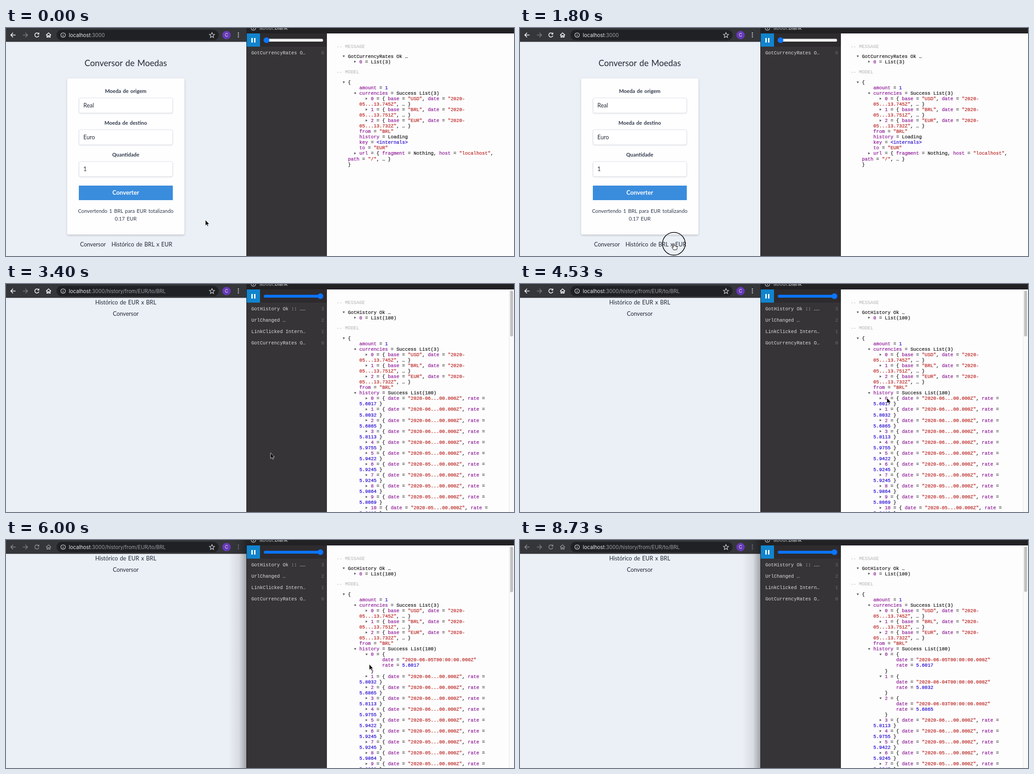
Animation of 1116 by 502 pixels, one loop 8.79 s. Source, as an HTML page:

```html
<!DOCTYPE html>
<html lang="pt">
<head>
<meta charset="utf-8">
<title>Conversor de Moedas</title>
<style>
html, body { margin: 0; width: 100%; height: 100%; overflow: hidden; background: #ebeff6 }
svg { display: block; width: 1116px; height: 502px }
.page { font-family: Lato, sans-serif; font-size: 12.5px; word-spacing: .1em; fill: #222b38 }
.page .c { text-anchor: middle }
.page .label { font-size: 11.35px; font-weight: 700; fill: #2f3a4a }
.page .sum { font-size: 11.25px; fill: #2f3a4a }
.field { fill: #fff; stroke: #dce1e9 }
.ui { font: 11.2px Inter, sans-serif }
.code { font: 10.44px "Liberation Mono", monospace; fill: #111; stroke: #111; stroke-width: .2 }
.code path, .code rect, .code circle { stroke: none }
.key { fill: #881391; stroke: #881391 }
.str { fill: #b5201c; stroke: #b5201c }
.num { fill: #1c00cf; stroke: #1c00cf }
.head { fill: #b4b4b4; stroke: none }
.item { fill: #dcdcdc; stroke: none }
.idx { fill: #6c6a6d; stroke: none }

.on, .icons, .shape { animation: 8.79s step-end infinite }
@keyframes route   { 0% { visibility: hidden } 21.27%, to { visibility: visible } }
@keyframes url     { 0% { visibility: hidden } 21.95%, to { visibility: visible } }
@keyframes loaded  { 0% { visibility: hidden } 30.7%,  to { visibility: visible } }
@keyframes blur    { 0% { visibility: hidden } 52.8%,  to { visibility: visible } }
@keyframes open1   { 0% { visibility: hidden } 65.3%,  to { visibility: visible } }
@keyframes open2   { 0% { visibility: hidden } 78.1%,  to { visibility: visible } }
@keyframes open3   { 0% { visibility: hidden } 88.05%, to { visibility: visible } }
.icons { animation-name: dim; color: #fff }
@keyframes dim { 0% { color: #fff } 52.8%, to { color: #8b8d91 } }

#arrow { animation-name: arrow }
#hand { animation-name: hand }
#beam { animation-name: beam }
@keyframes arrow {
  0%, 23.2%, 66.6%, 91% { visibility: visible }
  13.2%, 54.6%, 72.5% { visibility: hidden }
  to { visibility: visible }
}
@keyframes hand { 0%, 23.2%, to { visibility: hidden } 13.2% { visibility: visible } }
@keyframes beam { 0%, 66.6%, 91%, to { visibility: hidden } 54.6%, 72.5% { visibility: visible } }

#pointer { animation: move 8.79s ease-in-out infinite }
@keyframes move {
  0%, 2% { transform: translate(438px, 423px) }
  13.5% { transform: translate(342px, 467px) }
  17%, 22% { transform: translate(338px, 475px) }
  29.58%, 33% { transform: translate(485px, 424px) }
  48%, 55% { transform: translate(806px, 251px) }
  61.5%, 66.5% { transform: translate(792px, 252px) }
  68.26% { transform: translate(798px, 274px) }
  74%, 79.6% { transform: translate(791px, 300px) }
  84%, 89% { transform: translate(789.5px, 348px) }
  94.5%, to { transform: translate(880px, -30px) }
}
#ring { fill: none; stroke: #000; stroke-width: 1.5; vector-effect: non-scaling-stroke; animation: press 8.79s linear infinite }
@keyframes press {
  0%, 18.66%, 21.96%, 51.99%, 54.95%, 63.71%, 66.67%, 76.68%, 79.64%, 85.6%, 88.75%, to { transform: scale(0) }
  20.25%, 21.95%, 53.58%, 54.94%, 65.3%, 66.66%, 78.27%, 79.63%, 87.2%, 88.74% { transform: scale(1) }
}
</style>
</head>
<body>
<svg viewBox="0 0 1116 502">
  <defs>
    <linearGradient id="shade"><stop stop-opacity="0"/><stop offset=".6" stop-opacity=".08"/><stop offset="1" stop-opacity=".32"/></linearGradient>
    <filter id="drop" x="-10%" y="-10%" width="120%" height="120%"><feDropShadow dx="0" dy="2" stdDeviation="2" flood-opacity=".2"/></filter>
    <filter id="soft" x="-10%" y="-20%" width="120%" height="150%"><feDropShadow dx="0" dy="1" stdDeviation="1" flood-opacity=".14"/></filter>
  </defs>

  <g class="page">
    <rect y="30" width="528" height="472" fill="#ebeff6"/>
    <text class="c" x="263" y="84" font-size="18.6">Conversor de Moedas</text>
    <rect x="134.500" y="111" width="257.500" height="343.500" rx="3.500" fill="#fefeff" filter="url(#drop)"/>
    <text class="c label" x="263" y="142.700">Moeda de origem</text>
    <text class="c label" x="263" y="212.700">Moeda de destino</text>
    <text class="c label" x="263" y="282.700">Quantidade</text>
    <g class="field" filter="url(#soft)">
      <rect x="160.500" y="154" width="205.500" height="33" rx="3"/>
      <rect x="160.500" y="224" width="205.500" height="33" rx="3"/>
      <rect x="160.500" y="294" width="205.500" height="33" rx="3"/>
    </g>
    <text x="170" y="174.700">Real</text>
    <text x="170" y="244.700">Euro</text>
    <text x="170" y="314.700">1</text>
    <rect x="160" y="347" width="206.500" height="32" fill="#3a8ddd"/>
    <text class="c" x="263" y="367.300" font-size="13.1" font-weight="700" style="fill:#fff">Converter</text>
    <text class="c sum" x="263" y="407.300">Convertendo 1 BRL para EUR totalizando</text>
    <text class="c sum" x="263" y="424">0.17 EUR</text>
    <text class="c" x="191" y="481">Conversor</text>
    <text class="c" x="298.500" y="481">Histórico de BRL x EUR</text>
    <g class="on" style="animation-name:route">
      <rect y="30" width="528" height="472" fill="#ebeff6"/>
      <text class="c" x="263" y="44.500">Histórico de EUR x BRL</text>
      <text class="c" x="263" y="70">Conversor</text>
    </g>
  </g>

  <g class="ui">
    <rect width="528" height="30.500" fill="#35363a"/>
    <rect x="111" y="4" width="356" height="23" rx="11.500" fill="#202124"/>
    <g class="icons" fill="none" stroke="currentColor" stroke-width="1.500">
      <path d="M21 15.500H11M15.500 10.500l-5 5 5 5"/>
      <path d="M71.300 12.200a4.600 4.600 0 1 0 1 4.500"/>
      <path d="M73 9.500v4.700h-4.700z" fill="currentColor" stroke="none"/>
      <path d="M88 15.800l5.500-5 5.500 5M90 14.500v5.800h2.300v-3.500h2.400v3.500H97v-5.800"/>
      <path d="M510.500 10v2m0 2.300v2m0 2.300v2" stroke-width="2"/>
    </g>
    <path d="M37 15.500h10M42.500 10.500l5 5-5 5" fill="none" stroke="#7b7d81" stroke-width="1.500"/>
    <g fill="none" stroke="#d5d7da" stroke-width="1.200">
      <circle cx="125.500" cy="15.500" r="5"/>
      <path d="M125.500 14.800v3.600M125.500 12.200v1.400"/>
      <path d="M452.500 10l1.600 3.800 4.100.4-3.100 2.700.9 4-3.500-2.100-3.500 2.100.9-4-3.100-2.700 4.100-.4z"/>
    </g>
    <text x="138" y="19.500" fill="#e8eaed">localhost<tspan fill="#9aa0a6">:3000<tspan class="on" style="animation-name:url">/history/from/EUR/to/BRL</tspan></tspan></text>
    <circle cx="484.500" cy="15.500" r="9.300" fill="#673ab7"/>
    <text x="484.500" y="19" font-size="10" text-anchor="middle" fill="#e9e2f5">C</text>
    <rect class="on" style="animation-name:blur" x="488" width="40" height="502" fill="url(#shade)"/>
    <rect x="528" width="588" height="502" fill="#222225"/>
    <circle cx="543.500" cy="0" r="5" fill="none" stroke="#c5c7ca" stroke-width="1.200"/>
    <path d="M543.500 0v3" stroke="#c5c7ca" stroke-width="1.200"/>
    <text x="557" y="4.300" fill="#a3a6aa">about:<tspan fill="#d9dbde">blank</tspan></text>
  </g>

  <g id="debug" class="code"></g>

  <g id="pointer">
    <circle id="ring" r="25"/>
    <path id="arrow" class="shape" d="M0-.500V12.200L2.900 9.600 4.700 13.800 6.700 12.900 4.900 8.900H8.700Z" fill="#000" stroke="#fff" stroke-width=".8"/>
    <path id="hand" class="shape" d="M-1.200.500Q0-1 1.200.500V5Q2.500 4 3.500 5.300 4.800 4.700 5.600 6 7.200 5.600 7.200 7.500V10L5.800 13.500H-.500L-4 8.500Q-4.300 6.800-2.800 7L-1.200 8.300Z" fill="#fff" stroke="#000"/>
    <g id="beam" class="shape" fill="none">
      <path d="M-2.500-6.500Q0-6.500 0-4.500Q0-6.500 2.500-6.500M0-4.500V4.500M-2.500 6.500Q0 6.500 0 4.500Q0 6.500 2.500 6.500M-1.500 1.500h3" stroke="#fff" stroke-width="2.400"/>
      <path d="M-2.500-6.500Q0-6.500 0-4.500Q0-6.500 2.500-6.500M0-4.500V4.500M-2.500 6.500Q0 6.500 0 4.500Q0 6.500 2.500 6.500M-1.500 1.500h3" stroke="#000" stroke-width="1.200"/>
    </g>
  </g>
</svg>

<script>
const LINE = 12.05, INDENT = 25.06;
const rates = ['5.6017', '5.8032', '5.6865', '5.8113', '5.9755', '5.9422', '5.9245', '5.9245', '5.9864', '5.8069', '5.8412'];
const times = [['USD', '745'], ['BRL', '751'], ['EUR', '732']];
const log = ['GotCurrencyRates O…', 'LinkClicked Intern…', 'UrlChanged …', 'GotHistory Ok :: ……'];

const syntax = /("[^"]*(?:"|$)|^05[^"]*")|(\w+(?= =)|fragment(?=,h)|host(?=…))|(&lt;internals>|(?<![\w(.])\d+(?:\.\d+)?\b)/g;
const paint = s => s.replace(syntax, (m, str, key) =>
  `<tspan class="${str ? 'str' : key ? 'key' : 'num'}">${m}</tspan>`);

// Rows are [level, text, arrow]; arrow is 1 when open, 0 when closed.
const messages = {
  rates: [[0, 'GotCurrencyRates Ok …', 1], [1, '0 = List(3)', 0]],
  url: [[0, 'UrlChanged {fragment,host…}', 1], [1, 'fragment = Nothing'], [1, 'host = "localhost"'],
    [1, 'path = "/history/from/EUR/to/BRL"'], [1, 'port_ = Just 3000'], [1, 'protocol = Http'], [1, 'query = Nothing']],
  history: [[0, 'GotHistory Ok …', 1], [1, '0 = List(180)', 0]]
};

function historyRows(opened) {
  return rates.flatMap((rate, i) => i < opened
    ? [[2, `${i} = {`, 1], [3, `date = "2020-06-0${5 - i}T00:00:00.000Z"`], [3, `rate = ${rate}`], [2, '}']]
    : [[2, `${i} = { date = "2020-0${i < 5 ? 6 : 5}...00.000Z", rate =`, 0], [1, `${rate} }`]]);
}

function modelRows(home, opened) {
  return [
    [0, '{', 1], [1, 'amount = 1'], [1, 'currencies = Success List(3)', 1],
    ...times.flatMap(([base, ms], i) => [
      [2, `${i} = { base = "${base}", date = "2020-`, 0], [1, `05...13.${ms}Z", … }`]]),
    [1, 'from = "BRL"'],
    ...(opened < 0 ? [[1, 'history = Loading']] : [[1, 'history = Success List(180)', 1], ...historyRows(opened)]),
    [1, 'key = &lt;internals>'], [1, 'to = "EUR"'],
    [1, 'url = { fragment = Nothing, host = "localhost",' + (home ? '' : ' …'), 0],
    [0, home ? 'path = "/", … }' : '}'], [0, '}']
  ];
}

function panel(name, count, message, opened) {
  const full = count > 1;
  let y = 40, out = '';
  const text = (x, s, cls = '') => out += `<text x="${x}" y="${y + 3.5}" class="${cls}">${s}</text>`;
  const rows = list => list.forEach(([level, s, arrow]) => {
    const x = 751.3 + level * INDENT;
    if (y < 512) {
      text(x, paint(s));
      if (arrow !== undefined)
        out += `<path fill="#555" transform="translate(${x - 9.3} ${y})" d="${arrow ? 'M-2.5-1.500h5l-2.500 4z' : 'M-2-2.500v5l4-2.500z'}"/>`;
    }
    y += LINE;
  });

  out += `<rect x="529" y="12" width="176" height="490" fill="#363437"/>
    <rect x="529" y="12" width="176" height="29" fill="#2d2b2e"/>
    <rect x="529" y="12" width="29" height="29" fill="#1184ce"/>
    <path d="M539 22h3v10h-3zM545 22h3v10h-3z" fill="#fff"/>
    <rect x="566.500" y="23.700" width="130" height="6.400" rx="3.200" fill="${full ? '#0a75ff' : '#efefef'}"/>
    <circle cx="${full ? 690.7 : 572.3}" cy="26.800" r="6.200" fill="#0a75ff"/>
    <rect x="705" y="12" width="411" height="490" fill="#fefdfe"/>`;
  text(726, '-- MESSAGE', 'head');
  y = 62;
  rows(message);
  y += 10.8;
  text(726, '-- MODEL', 'head');
  y += 22.4;
  rows(modelRows(count === 1, opened));
  for (let i = 0; i < count; i++) {
    y = 54 + 25 * (count - 1 - i);
    text(539, log[i], 'item');
    text(692.5, i, 'idx');
  }
  if (opened >= 0)
    out += `<rect x="1105" y="12" width="11" height="490" fill="#fafafa"/>
      <rect x="1105" y="12" width="1" height="490" fill="#e8e8e8"/>
      <rect x="1107.500" y="14.500" width="6.500" height="${101 - Math.min(opened, 2) * .6}" rx="3.250" fill="#c1c1c1"/>`;
  return `<g class="${name && 'on'}" style="animation-name:${name || 'none'}">${out}</g>`;
}

document.getElementById('debug').innerHTML =
  panel('', 1, messages.rates, -1) +
  panel('url', 3, messages.url, -1) +
  ['loaded', 'open1', 'open2', 'open3'].map((name, i) => panel(name, 4, messages.history, i)).join('');
</script>
</body>
</html>
```
